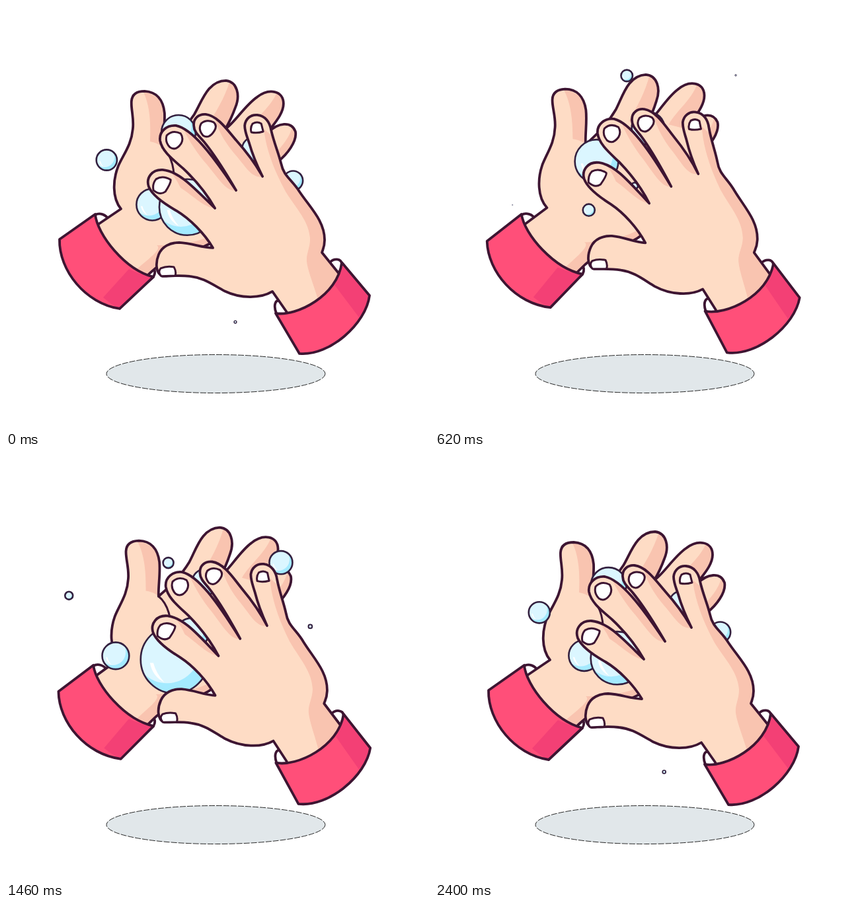
Animation, 640 px wide and 640 px high, one loop 2.42 s. Source, as an HTML page:

```html
<!DOCTYPE html>
<html lang="en">
<head>
<meta charset="utf-8">
<title>Hand washing</title>
<style>
  html, body { margin: 0; width: 100%; height: 100%; overflow: hidden; background: #fff; }
  svg { display: block; width: 100%; height: 100%; }
  .line { fill: none; stroke: #3d1532; stroke-width: 3.8; stroke-linecap: round; stroke-linejoin: round; }
  .thin { stroke-width: 3; }
  .skin { fill: #fedcc5; }
  .shade { fill: #f9c4b0; }
  .pink { fill: #ff4f79; }
  .rose { fill: #f34075; }
  .line.white { fill: #fff; }
</style>
</head>
<body>
<svg viewBox="0 0 640 640">
  <defs>
    <path id="backShape" d="M126 356 L140 330 L174 307 C160 290 162 262 170 242 C178 224 190 210 192 186 C194 170 189 156 190 144
      C191 132 200 129 210 129 C228 130 238 142 240 162 C241 180 237 198 237 214 C255 200 272 184 285 164
      C296 146 305 113 333 113 C350 115 355 135 347 154 C343 165 338 176 332 186 C345 178 362 150 380 138
      C398 124 420 128 420 148 C420 165 402 182 396 192 C412 176 432 174 438 190 C441 205 425 225 412 235
      L330 340 C320 355 300 368 270 372 C250 378 235 388 218 404 L195 426 Z"/>
    <path id="frontShape" d="M446 506 L424 462 L403 432 C385 443 355 443 330 431 C310 420 298 411 278 409 C262 407 245 409 237 409
      C226 405 226 388 231 376 C236 364 248 358 262 358 C282 359 296 366 313 366 C300 344 278 322 258 310
      C242 301 222 288 216 274 C211 260 221 247 237 248 C262 250 285 276 316 306 C302 281 285 262 268 246
      C252 232 236 220 233 204 C231 190 243 180 257 181 C281 186 310 222 348 279 C330 248 313 222 299 205
      C291 196 284 190 284 181 C283 170 292 163 302 164 C320 166 335 188 348 203 C365 222 377 238 388 258
      C378 238 372 222 368 208 C364 196 361 190 361 181 C362 171 370 164 380 165 C392 166 399 176 401 188
      C405 206 412 222 416 238 C420 258 432 262 444 281 C460 305 482 325 482 354 C482 365 479 369 478 373
      L503 404 L526 436 Z"/>
    <path id="backCuff" d="M81 353 L135 315 C138 346 180 399 223 410 L172 458 C120 450 80 400 81 353 Z"/>
    <path id="frontCuff" d="M408 465 C440 470 502 438 508 388 L550 438 C545 480 490 530 444 526 Z"/>
    <clipPath id="backClip"><use href="#backShape"/></clipPath>
    <clipPath id="frontClip"><use href="#frontShape"/></clipPath>
    <clipPath id="bubbleClip"><circle r="20"/></clipPath>
    <g id="bubble">
      <g clip-path="url(#bubbleClip)">
        <circle r="20" fill="#a4eaff"/>
        <circle cx="-4.5" cy="-5.5" r="19.5" fill="#dbf6ff"/>
      </g>
      <path d="M-14.5 2 Q-13 10 -6 13.5 Q-11 8 -12.5 2 Z" fill="#fff"/>
      <circle r="20" fill="none"/>
    </g>
  </defs>

  <ellipse cx="317.5" cy="556.5" rx="165.5" ry="29" fill="#e1e7ea" stroke="#111" stroke-width=".9" stroke-dasharray="9 2"/>

  <g id="back">
    <path class="line white" d="M135 316 C142 312 152 316 155 323 L150 345 L128 345 Z M222 394 Q228 402 223 410 L205 425 L200 400 Z"/>
    <use href="#backShape" class="skin"/>
    <g class="shade" clip-path="url(#backClip)">
      <path d="M206 126 C219 150 219 180 218 205 C230 207 238 214 238 214 L250 150 Z"/>
      <path d="M340 110 C331 140 318 160 304 182 L332 194 L360 140 Z"/>
      <path d="M412 126 C403 153 378 168 364 190 L396 200 L430 150 Z"/>
      <path d="M434 180 C430 200 415 215 402 230 L420 240 L445 195 Z"/>
      <path d="M345 325 C310 350 290 362 228 362 C238 368 212 385 196 400 L220 425 L330 385 Z"/>
    </g>
    <use href="#backShape" class="line"/>
    <path class="line thin" d="M237 214 C251 226 257 250 253 276 M280 212 Q291 212 299 222"/>
    <use href="#backCuff" class="pink"/>
    <path class="rose" d="M186 398 L147 441 Q162 454 172 458 L223 410 Q202 406 186 398 Z"/>
    <use href="#backCuff" class="line"/>
  </g>

  <g id="bubbles" stroke="#33203f"></g>

  <g id="front">
    <path class="line white" d="M409 465 C404 452 408 444 414 446 L430 455 L430 490 Z M490 388 C496 381 507 382 508 390 L520 420 L490 410 Z"/>
    <use href="#frontShape" class="skin"/>
    <g class="shade" clip-path="url(#frontClip)">
      <path d="M390 186 C393 216 406 250 423 281 C440 308 458 325 460 352 C460 367 454 374 455 387 C457 402 464 417 474 450 L530 440 L500 300 L430 220 Z"/>
      <path d="M247 249 C268 258 288 279 316 306 C300 305 284 288 264 275 Q258 262 247 249 Z"/>
      <path d="M268 186 C291 201 315 230 348 279 C334 282 322 262 304 240 C290 224 278 206 268 186 Z"/>
      <path d="M316 171 C338 190 368 218 388 258 C372 262 362 242 346 224 C334 210 322 192 316 171 Z"/>
    </g>
    <use href="#frontShape" class="line"/>
    <path class="line thin white" d="M227 262 Q237 256 249 263 Q250 267 241 281 Q233 287 223 279 Q221 269 227 262 Z
      M243 196 Q252 187 264 193 Q269 200 265 208 Q257 220 248 214 Q240 206 243 196 Z
      M295 178 Q303 171 314 176 Q320 181 315 189 Q307 202 298 196 Q290 187 295 178 Z
      M373 178 Q380 174 386 178 L389 190 Q379 193 371 191 Q369 184 373 178 Z
      M234 397 Q243 393 254 395 Q258 402 256 408 L235 409 Q229 403 234 397 Z"/>
    <use href="#frontCuff" class="pink"/>
    <path class="rose" d="M497 422 L534 471 Q548 455 550 438 L508 388 Q506 406 497 422 Z"/>
    <use href="#frontCuff" class="line"/>
  </g>
</svg>
<script>
const LOOP = 2420, LIFE = LOOP / 2, RUB = LOOP / 3, LAG = 16;
const HUB = { x: 316, y: 300, gap: 25 };

// Every bubble leaves the hub towards its own point: birth time, x, y, peak radius
const bubbles = [
  [400, 465, 255, 20],
  [150, 348, 484, 13.5],
  [718, 457, 102, 20],
  [1205, 327, 104, 25],
  [900, 287, 81, 20],
  [460, 241, 151, 30],
  [1095, 218, 211, 37],
  [685, 116, 301, 25],
  [785, 230, 309, 53],
  [495, 74, 201, 17]
];

const $ = id => document.getElementById(id);
const ease = u => (1 - Math.cos(Math.PI * u)) / 2;
const swell = u => Math.sin(Math.PI * u) ** 2;

const nodes = bubbles.map(() => $("bubbles").appendChild($("bubble").cloneNode(true)));
nodes.forEach(node => node.removeAttribute("id"));

function moveBubble(node, [born, x, y, peak], t) {
  const u = ((t - born + LOOP) % LIFE) / LIFE;
  const dx = x - HUB.x, dy = y - HUB.y;
  const first = HUB.gap / Math.hypot(dx, dy);
  const k = first + (1 - first) * ease(u);
  const r = Math.max(0.01, peak * swell(u));
  const scale = r / 20;
  node.setAttribute("transform", `translate(${HUB.x + dx * k} ${HUB.y + dy * k}) scale(${scale})`);
  node.setAttribute("stroke-width", 0);
  node.lastElementChild.setAttribute("stroke-width", Math.min(2.6, r * 0.7) / scale);
}

function draw(t) {
  const k = ease(2 * (t + LAG) / RUB);
  $("front").setAttribute("transform", `rotate(${7.1 * k} 480 476)`);
  $("back").setAttribute("transform", `rotate(${-7.3 * k} 135 402)`);
  bubbles.forEach((bubble, i) => moveBubble(nodes[i], bubble, t));
}

const start = performance.now();
function tick(now) {
  draw(Math.max(0, now - start) % LOOP);
  requestAnimationFrame(tick);
}
draw(0);
requestAnimationFrame(tick);
</script>
</body>
</html>
```
